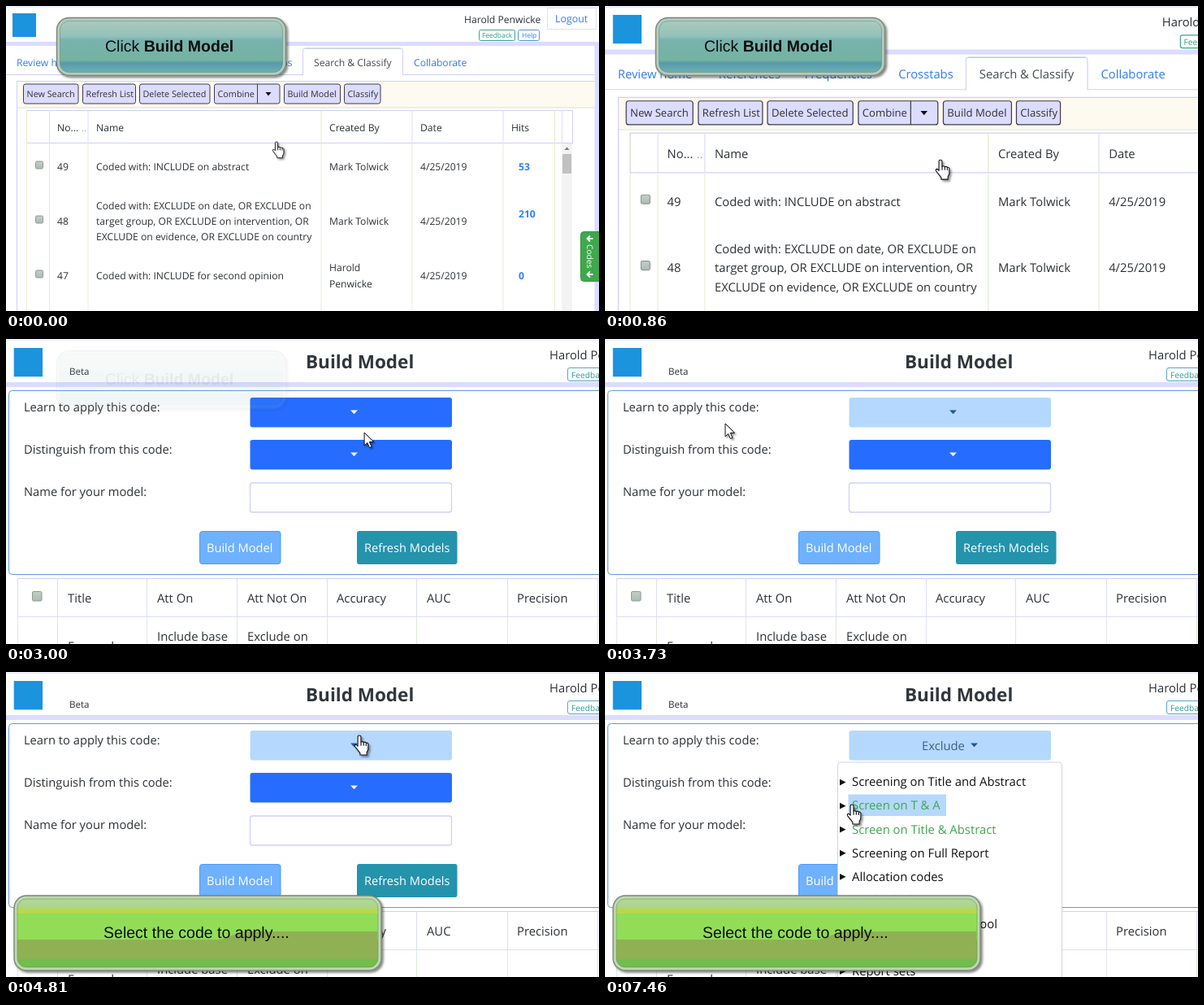
Animation, 730 px wide and 375 px high, one loop 7990 ms. Source, as an HTML page:

```html
<!DOCTYPE html>
<html lang="en">
<head>
<meta charset="utf-8">
<title>Build Model tutorial</title>
<style>
html, body { margin: 0; width: 100%; height: 100%; overflow: hidden; background: #fff; }
svg { display: block; width: 730px; height: 375px; }
text { font-family: "Open Sans", "Noto Sans", sans-serif; text-rendering: geometricPrecision; white-space: pre; }
.arial { font-family: "Liberation Sans", Arial, sans-serif; }
</style>
</head>
<body>
<svg id="stage" viewBox="0 0 730 375" xmlns="http://www.w3.org/2000/svg"></svg>
<script>
const LOOP = 7990, ZOOM = 1.216;
const LILAC = '#dcdcff', EDGE = '#cfcfff', INK = '#2c3136', LINK = '#2f7cf6', BLUE = '#266dff',
  PALE = '#b5d8ff', GREEN = '#3fa84c';
const USER = ['Harold', 'Penwicke'], CODER = 'Mark Tolwick';

// Markup helpers
const text = (x, y, s, size, fill = INK, extra = '') =>
  `<text x="${x}" y="${y}" font-size="${size}" fill="${fill}" ${extra}>${s}</text>`;
const rect = (x, y, w, h, fill, stroke = 'none', r = 0, extra = '') =>
  `<rect x="${x}" y="${y}" width="${w}" height="${h}" rx="${r}" fill="${fill}" stroke="${stroke}" ${extra}/>`;
const line = (x1, y1, x2, y2, c) =>
  `<path d="M${x1} ${y1}L${x2} ${y2}" stroke="${c}" fill="none"/>`;
const caret = (x, y, c, id = '') =>
  `<path id="${id}" d="M${x - 4.5} ${y}h9l-4.5 4.8z" fill="${c}"/>`;
const check = (x, y, s) => rect(x, y, s, s, 'url(#box)', '#8f9a94', 1.5);
const stops = list => list.map(([o, c]) => `<stop offset="${o}" stop-color="${c}"/>`).join('');
const grad = (id, list) =>
  `<linearGradient id="${id}" x1="0" y1="0" x2="0" y2="1">${stops(list)}</linearGradient>`;
const banner = (id, x, y, w, h, fill, rim, label) =>
  `<g id="${id}"><g filter="url(#drop)">${rect(x, y, w, h, rim, '#7b8579', 15, 'stroke-width="1.4"')}</g>` +
  rect(x + 4, y + 4, w - 8, h - 8, `url(#${fill})`, '#5f7a5c', 11, 'stroke-opacity=".45"') + label + '</g>';

const defs = `<defs>
${grad('box', [[0, '#c3cfc8'], [1, '#a9bdaf']])}
${grad('teal', [[0, '#a9cbbf'], [.3, '#93c1b9'], [.37, '#78b2ae'], [.76, '#74b3a0'], [.82, '#559aaa'], [1, '#6cb0b4']])}
${grad('lime', [[0, '#b3d79a'], [.13, '#aad688'], [.15, '#b9d84b'], [.21, '#b9d84b'], [.22, '#92dd58'],
  [.59, '#92dd58'], [.6, '#8fb153'], [.87, '#8fb153'], [.89, '#72bd4c'], [1, '#72bd4c']])}
<filter id="drop" x="-10%" y="-10%" width="120%" height="130%">
<feDropShadow dx="2" dy="2" stdDeviation="1.5" flood-opacity=".5"/></filter>
<filter id="soft" x="-30%" y="-30%" width="190%" height="190%">
<feDropShadow dx="2" dy="2" stdDeviation="1" flood-opacity=".4"/></filter>
</defs>`;

function searchPage() {
  const S = 12.15, B = 10.8;
  let s = rect(0, 0, 730, 375, '#fff') + line(0, 1, 730, 1, LILAC) +
    rect(8, 9, 29, 29, '#1b93dd') + text(64, 36, 'Beta', 9.5) +
    text(564, 20.5, USER.join(' '), S) +
    rect(666.5, 2.5, 60, 26, '#fff', '#dfdff0') + text(676, 20, 'Logout', 12.4, LINK) +
    rect(582.5, 29.5, 44, 13, '#fff', '#3aa58f', 2) + text(586, 39.3, 'Feedback', 8.4, '#2e9a80') +
    rect(630.5, 29.5, 26, 13, '#fff', '#4b93e8', 2) + text(635, 39.3, 'Help', 8.4, LINK) +
    rect(0, 44, 730, 5, LILAC) + rect(724.5, 49, 6, 326, LILAC);
  // Tabs
  s += line(0, 84.5, 724, 84.5, EDGE) +
    `<path d="M365.5 85V55q0-3 3-3h117q3 0 3 3v30" fill="#fff" stroke="${EDGE}"/>` +
    line(368, 52.2, 486, 52.2, '#b9cfc0') + rect(366, 84, 122, 2, '#fff');
  [[13, 'Review home'], [115, 'References'], [202, 'Frequencies'], [297, 'Crosstabs'],
    [379, 'Search &amp; Classify'], [502, 'Collaborate']]
    .forEach(([x, label], i) => s += text(x, 73.5, label, S, i === 4 ? '#444b52' : LINK));
  // Toolbar
  s += rect(13.5, 92.5, 711, 32, '#fffaf0') + line(13, 92.5, 724, 92.5, EDGE) +
    line(13, 125, 724, 125, '#d5e3cf') + line(13.5, 92, 13.5, 375, EDGE);
  [[21.5, 67.5, 'New Search'], [94.5, 65, 'Refresh List'], [164.5, 86.5, 'Delete Selected'],
    [256.5, 80.5, 'Combine'], [342.5, 69, 'Build Model'], [416.5, 44.5, 'Classify']]
    .forEach(([x, w, label], i) => {
      const id = i === 4;
      if (id) s += rect(x - 1.5, 94.5, w + 3, 27, 'none', '#d3d3fa', 4, 'stroke-width="3" id="ring1"');
      s += rect(x, 96, w, 24, LILAC, '#3c3c48', 2.5, id ? 'id="build"' : '') +
        text(x + 4, 112, label, B, INK, id ? 'id="buildText"' : '');
    });
  s += line(309.5, 96, 309.5, 120, '#3c3c48') + '<path d="M319.5 106h7l-3.5 4.5z" fill="#111"/>';
  // Grid
  s += rect(25.5, 128.5, 672, 40, '#fff', EDGE);
  [25.5, 53.5, 101, 388, 500, 612, 675.5].forEach((x, i) =>
    s += line(x, 128, x, 168, i % 3 ? LILAC : '#e8e6c8') + line(x, 168, x, 375, i % 2 ? '#e3eed8' : '#ececd8'));
  s += line(684.5, 128, 684.5, 168, LILAC);
  [[63, 'No...'], [111, 'Name'], [398, 'Created By'], [510, 'Date'], [622, 'Hits']]
    .forEach(([x, label]) => s += text(x, 153.5, label, S));
  s += text(93, 153.5, '..', 11, '#8b9bd0');
  const row = (y, no, lines, who, hits, hy) => {
    s += check(36.5, y - 6.5, 9) + text(63, y + 4.5, no, S) + text(510, y + 4.5, '4/25/2019', S) +
      text(631, hy, hits, S, '#2f80ff', 'font-weight="700"');
    [[111, lines], [398, who]].forEach(([x, list]) => list.forEach((v, i) =>
      s += text(x, y + 4.5 + (i - (list.length - 1) / 2) * 19.3, v, S)));
  };
  row(197.5, 49, ['Coded with: INCLUDE on abstract'], [CODER], 53, 202);
  row(264.5, 48, ['Coded with: EXCLUDE on date, OR EXCLUDE on', 'target group, OR EXCLUDE on intervention, OR',
    'EXCLUDE on evidence, OR EXCLUDE on country'], [CODER], 210, 259.5);
  row(331.5, 47, ['Coded with: INCLUDE for second opinion'], USER, 0, 336);
  // Scroll bar and side tab
  s += rect(684, 169, 13, 206, '#f3f3f3') + '<path d="M687.5 177h6l-3-3.5z" fill="#777"/>' +
    rect(685, 182, 11, 24, '#c1c1c1') +
    rect(707.5, 277.5, 30, 61, GREEN, '#36963f', 4) +
    text(0, 0, 'Codes', 10.2, '#fff', 'transform="translate(714.5 293) rotate(90)"');
  [286, 330].forEach(y => s += `<path d="M722.5 ${y}h-7m3.5-3.5l-3.5 3.5 3.5 3.5" fill="none" stroke="#fff" stroke-width="1.8"/>`);
  return s;
}

function modelPage() {
  const S = 14.8;
  let s = rect(0, 0, 730, 375, '#fff') + line(0, 1.2, 730, 1.2, LILAC) +
    rect(9.7, 11, 35.3, 35.3, '#1b93dd') + text(78, 43.8, 'Beta', 11.6) +
    text(369, 36, 'Build Model', 22.5, '#30373d', 'font-weight="700"') +
    text(669, 25, USER.join(' '), S) +
    rect(691.5, 35.5, 54, 16, '#fff', '#5aa5c8', 2.5) + text(696, 47.5, 'Feedback', 10.2, '#2e9a9a') +
    rect(0, 53, 730, 6, LILAC) + rect(3.5, 63.5, 760, 226, '#fff', '#5b9be0', 4);
  ['Learn to apply this code:', 'Distinguish from this code:', 'Name for your model:']
    .forEach((v, i) => s += text(22, 89 + i * 52.2, v, 14.7));
  s += rect(300.5, 72, 248.5, 36.5, BLUE, 'none', 3, 'id="learn"') + caret(428.5, 87.5, '#fff', 'learnCaret') +
    text(390, 95.7, 'Exclude', S, '#3f5f86', 'id="pick"') +
    rect(300.5, 124, 248.5, 36.5, BLUE, 'none', 3) + caret(428.5, 139.5, '#e8efff') +
    rect(300.5, 177, 248, 36, '#fff', EDGE, 3, 'stroke-width="1.3"') +
    rect(238.5, 236.5, 99.5, 40, '#6eb1ff', '#4f97fb', 3) + text(247, 262, 'Build Model', 14.6, '#fff') +
    rect(432, 236, 123.5, 41, '#2493ac', 'none', 3) + text(441, 262, 'Refresh Models', 14.6, '#fff');
  // Table of models
  s += line(14, 294.5, 730, 294.5, EDGE) + line(14, 341.5, 730, 341.5, LILAC) + check(32.5, 310.5, 11.5);
  [14.5, 63.5, 173.5, 284.5, 395.5, 505.5, 617.5, 728.5].forEach((x, i) =>
    s += line(x, 294, x, 342, LILAC) + line(x, 342, x, 375, i % 2 ? '#d9ead9' : '#e4e4f4'));
  [[76, 'Title'], [186, 'Att On'], [297, 'Att Not On'], [407, 'Accuracy'], [518, 'AUC'], [629, 'Precision']]
    .forEach(([x, v]) => s += text(x, 323.8, v, S));
  s += text(76, 383, 'Forward', S) + text(186, 371.3, 'Include base', S) + text(297, 371.3, 'Exclude on', S);
  // Drop-down tree
  s += '<g id="menu">' + rect(286.5, 111, 276, 290, '#fff', EDGE, 4) + line(286.5, 116, 286.5, 375, '#c4e0c4') +
    rect(299.5, 121.5, 223, 26.5, PALE, 'none', 0, 'id="hot0"') + rect(299.5, 150.5, 120.5, 26.5, PALE, 'none', 0, 'id="hot1"');
  ['Screening on Title and Abstract', 'Screen on T &amp; A', 'Screen on Title &amp; Abstract', 'Screening on Full Report',
    'Allocation codes', 'Methods data', 'Risk of bias screening tool', 'Outcomes', 'Report sets'].forEach((v, i) => {
    const y = 140.4 + i * 29.05;
    s += `<path d="M289 ${y - 8.7}l7.5 3.9-7.5 3.9z" fill="#111"/>` +
      text(304, y, v, 14.85, i === 1 || i === 2 ? GREEN : '#111');
  });
  return s + '</g>';
}

const HAND = 'M4.5 2.5a1.7 1.7 0 0 1 3.4 0V8q1.4-1.2 3 .3q1.6-.8 2.7 .6q1.8-.4 2.2 1.2V15q0 2-1.5 4V22H7V20L1.5 13q-1-2 .7-2.3q1 0 2.3 1.8z';
const stage = document.getElementById('stage');
stage.innerHTML = defs + `<g id="search">${searchPage()}</g><g id="model">${modelPage()}</g>` +
  banner('callout1', 62.5, 14.5, 282, 71, 'teal', '#b3cbbf',
    text(122, 56, 'Click <tspan font-weight="700">Build Model</tspan>', 19.5, '#0b0f0e', 'class="arial"')) +
  banner('callout2', 10, 275, 452, 92, 'lime', '#bdd9ae',
    '<path d="M262 329.5L292 319H457.5V330H262z" fill="#8fb153"/>' +
    text(120, 326.5, 'Select the code to apply....', 19.55, '#0b0f0a', 'class="arial"')) +
  `<g id="cursor" filter="url(#soft)" stroke="#111" stroke-linejoin="round">
  <g id="hand" fill="#fff"><path d="${HAND}"/><path d="M8 8v4M10.9 8.3v3.7M13.6 9v3.2" fill="none"/></g>
  <path id="arrow" fill="#fff" d="M0 0V16l3.7-3.5 2.7 6 2.6-1.1-2.7-6H11.5z"/></g>`;

const el = {};
stage.querySelectorAll('[id]').forEach(n => el[n.id] = n);
const show = (n, on) => n.style.display = on ? '' : 'none';
const set = (n, k, v) => n.setAttribute(k, v);
const span = (t, a, b) => Math.min(1, Math.max(0, (t - a) / (b - a)));
const ease = u => (1 - Math.cos(Math.PI * u)) / 2;

// Pointer tip: start time, end time, x, y; the first leg is in page units
const start = [333, 167], legs = [
  [690, 1290, 448 / ZOOM, 129 / ZOOM], [2900, 3330, 395, 22], [3330, 3730, 148, 104],
  [3760, 4720, 435, 78], [4820, 5000, 430, 85], [6000, 6750, 303, 162], [6840, 6880, 304, 163]];
function pointer(t, zoom) {
  let [x, y] = start, k = zoom;
  legs.forEach(([a, b, ex, ey], i) => {
    if (t < a) return;
    if (i === 1) { x *= k; y *= k; k = 1; }
    const u = ease(span(t, a, b));
    x += (ex - x) * u;
    y += (ey - y) * u;
  });
  return [x * k, y * k];
}

function draw(t) {
  const zoom = 1 + (ZOOM - 1) * ease(span(t, 210, 820));
  const onModel = t >= 2760;
  show(el.search, !onModel);
  show(el.model, onModel);
  set(el.search, 'transform', `scale(${zoom})`);

  const hover = t >= 1160;
  set(el.build, 'fill', hover ? '#b6b6b6' : LILAC);
  set(el.build, 'stroke', hover ? '#a5a5ad' : '#3c3c48');
  set(el.buildText, 'fill', hover ? '#606066' : INK);
  set(el.ring1, 'opacity', span(t, 2150, 2260));

  const [x, y] = pointer(t, zoom);
  const lit = t >= 3420, picked = t >= 7280;
  const ring = span(t, 5410, 5570) * (1 - span(t, 7260, 7460));
  set(el.learn, 'fill', lit ? PALE : BLUE);
  set(el.learn, 'stroke', ring ? PALE : 'none');
  set(el.learn, 'stroke-width', 6 * ring);
  set(el.learnCaret, 'fill', lit ? '#1d55ad' : '#fff');
  set(el.learnCaret, 'transform', picked ? 'translate(26 0)' : '');
  show(el.pick, picked);
  show(el.menu, t >= 5450);
  show(el.hot0, y > 121 && y < 150);
  show(el.hot1, y >= 150);

  set(el.callout1, 'opacity', 1 - span(t, 2470, 3050));
  set(el.callout2, 'opacity', span(t, 3760, 4450));

  const arrow = onModel && !(x > 300 && y > 70 && t > 3760);
  show(el.arrow, arrow);
  show(el.hand, !arrow);
  const press = (t >= 1800 && t < 2200) || (t >= 5050 && t < 5450) || (t >= 6880 && t < 7280) ? 1 : 0;
  const size = arrow ? 1 : .93 * zoom;
  const dx = arrow ? 0 : -6.2 * size, dy = arrow ? 0 : -.8 * size + press;
  set(el.cursor, 'transform', `translate(${x + dx} ${y + dy}) scale(${size})`);
}

const begin = performance.now();
function tick() {
  draw((performance.now() - begin) % LOOP);
  requestAnimationFrame(tick);
}
tick();
</script>
</body>
</html>
```
